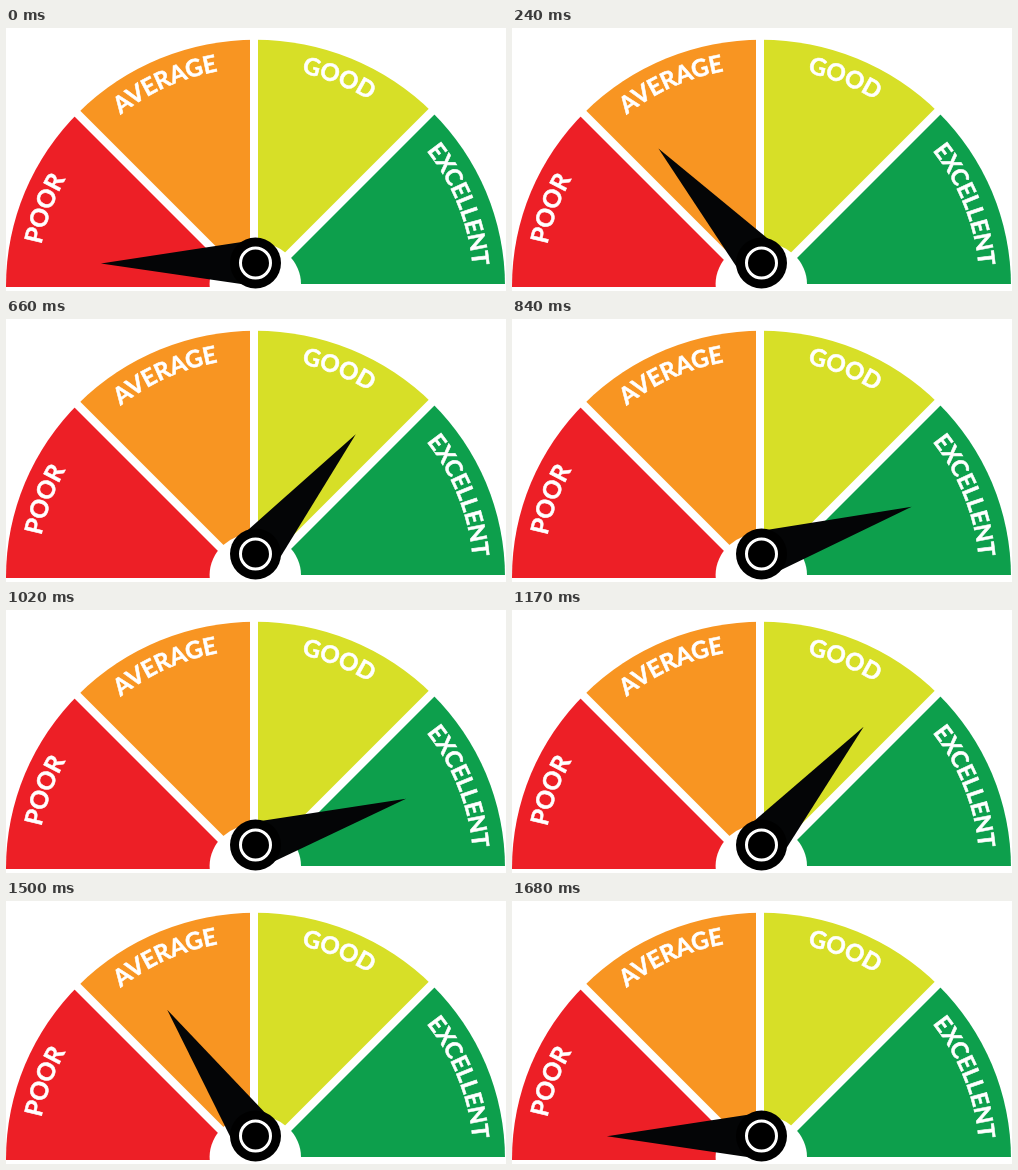
Recreate the animation shown at these times as an HTML page with a canvas. Size 500 by 263 pixels, loop 1.78 s.

```html
<!DOCTYPE html>
<html lang="en">
<head>
<meta charset="utf-8">
<title>Rating gauge</title>
<style>
html, body { margin: 0; width: 100%; height: 100%; overflow: hidden; background: #fff; }
canvas { display: block; width: 500px; height: 263px; }
</style>
</head>
<body>
<canvas id="stage"></canvas>
<script>
const W = 500, H = 263, LOOP = 1780, STEP = 30, LAST = 56;
const DIAL = { x: 249.5, y: 258, rx: 249.5, ry: 246.2 };
const HUB = { x: 249.5, y: 235 };
// the tip circles a point slightly off the hub
const TIP = { x: 251.2, y: 236.6, r: 156.3 };
const rad = Math.PI / 180;

// colour, then the polygon that cuts the sector out of the dial
const sectors = [
  ['#ed1f26', [[-20, 259], [-20, 0], [239, 259]]],
  ['#f89522', [[244, 252.5], [-8.5, 0], [244, 0]]],
  ['#d7df27', [[252, 251.5], [252, 0], [503.5, 0]]],
  ['#0d9f4c', [[259, 256], [520, -5], [520, 256]]]
];

// word, dial angle of its middle clockwise from the top, font size
const labels = [['POOR', -69.8, 24.4], ['AVERAGE', -24.1, 23.8],
                ['GOOD', 21.9, 23.8], ['EXCELLENT', 68.2, 23.2]];

// step number and needle turn in degrees
const keys = [[0, 0.4], [18, 107.3], [28, 161.8], [31, 179], [36, 151],
              [39, 130], [45, 94], [47, 82], [56, 0.5]];

const canvas = document.getElementById('stage');
const ctx = canvas.getContext('2d');
const dpr = window.devicePixelRatio || 1;
canvas.width = W * dpr;
canvas.height = H * dpr;
ctx.scale(dpr, dpr);

function polygon(points, color) {
  ctx.beginPath();
  points.forEach(([x, y]) => ctx.lineTo(x, y));
  ctx.closePath();
  ctx.fillStyle = color;
  ctx.fill();
}

function oval(x, y, rx, ry, color) {
  ctx.beginPath();
  ctx.ellipse(x, y, rx, ry, 0, 0, 2 * Math.PI);
  ctx.fillStyle = color;
  ctx.fill();
}

function arcText(word, middle, size) {
  const r = 218;
  const width = s => ctx.measureText(s).width;
  ctx.font = `bold ${size}px Lato, Carlito, sans-serif`;
  ctx.fillStyle = ctx.strokeStyle = '#fff';
  ctx.lineWidth = 0.6;
  const total = width(word);
  for (let i = 0; i < word.length; i++) {
    const w = width(word[i]);
    const pos = width(word.slice(0, i + 1)) - w / 2 - total / 2;
    ctx.save();
    ctx.translate(DIAL.x, DIAL.y);
    ctx.rotate(middle * rad + pos / r);
    ctx.fillText(word[i], -w / 2, -r);
    ctx.strokeText(word[i], -w / 2, -r);
    ctx.restore();
  }
}

function drawDial() {
  ctx.fillStyle = '#fff';
  ctx.fillRect(0, 0, W, H);
  ctx.save();
  ctx.beginPath();
  ctx.ellipse(DIAL.x, DIAL.y, DIAL.rx, DIAL.ry, 0, 0, 2 * Math.PI);
  ctx.clip();
  sectors.forEach(([color, points]) => polygon(points, color));
  ctx.restore();
  oval(249.3, 256, 45.7, 42, '#fff');
  labels.forEach(label => arcText(...label));
}

function turnAt(step) {
  const i = Math.max(1, keys.findIndex(k => k[0] >= step));
  const [a, from] = keys[i - 1], [b, to] = keys[i];
  return from + (to - from) * (step - a) / (b - a);
}

function drawNeedle(turn) {
  const dx = -Math.cos(turn * rad), dy = -Math.sin(turn * rad);
  const corner = side => [HUB.x + 9 * dx - side * dy, HUB.y + 9 * dy + side * dx];
  polygon([[TIP.x + TIP.r * dx, TIP.y + TIP.r * dy], corner(21.8), corner(-21.8)], '#040506');
  oval(HUB.x, HUB.y, 25.5, 25.5, '#000');
  ctx.beginPath();
  ctx.arc(HUB.x, HUB.y, 15, 0, 2 * Math.PI);
  ctx.lineWidth = 3;
  ctx.strokeStyle = '#fff';
  ctx.stroke();
}

function render() {
  const step = Math.min(LAST, Math.floor((performance.now() - start) % LOOP / STEP));
  drawDial();
  drawNeedle(turnAt(step));
  requestAnimationFrame(render);
}

const start = performance.now();
render();
</script>
</body>
</html>
```
